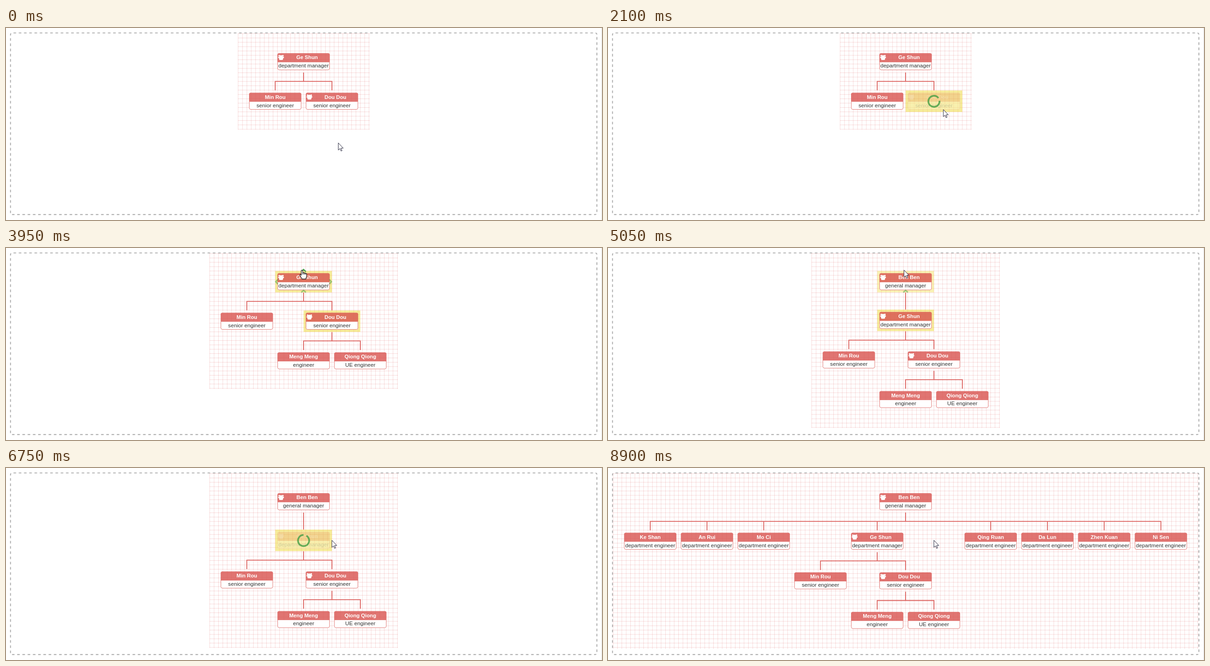
An HTML page with a canvas that plays this animation: 1280 px wide and 414 px high, repeating every 9.7 s.

```html
<!DOCTYPE html>
<html lang="en">
<head>
<meta charset="utf-8">
<title>Org chart</title>
<style>
html, body { margin: 0; width: 100%; height: 100%; overflow: hidden; background: #fff; }
canvas { display: block; }
</style>
</head>
<body>
<canvas id="stage" width="1280" height="414"></canvas>
<script>
const ctx = document.getElementById('stage').getContext('2d');
const LOOP = 9700, STEP = 50;
const MID = 639.1, SLOT = 60.93, ROW = 85.3, TOP = 54.3;
const SCALE = 1280 / 1366;
const RED = 'rgba(217,83,79,0.8)';
const FONT = '"Liberation Sans", Arial, sans-serif';

const person = (name, role, team) => ({ name, role, team });
const people = {
  boss: person('Ben Ben', 'general manager', true),
  head: person('Ge Shun', 'department manager', true),
  left: person('Min Rou', 'senior engineer'),
  lead: person('Dou Dou', 'senior engineer', true),
  dev: person('Meng Meng', 'engineer'),
  ux: person('Qiong Qiong', 'UE engineer')
};
const peers = ['Ke Shan', 'An Rui', 'Mo Ci', 'Qing Ruan', 'Da Lun', 'Zhen Kuan', 'Ni Sen']
  .map(name => person(name, 'department engineer'));
const peerSlots = [-9, -7, -5, 3, 5, 7, 9];

// A tree node: who, horizontal half-slot, header top, children
const node = (who, k, y, kids = []) => ({ who, x: MID + k * SLOT, y, kids });

function team(y, kHead, kLeft, kLead, open) {
  const y3 = y + 2 * ROW;
  const kids = open ? [node(people.dev, kLead - 1, y3), node(people.ux, kLead + 1, y3)] : [];
  return node(people.head, kHead, y, [
    node(people.left, kLeft, y + ROW),
    node(people.lead, kLead, y + ROW, kids)
  ]);
}

const scenes = [
  { from: 0, box: [498.1, 781, 219], root: team(TOP, 0, -1, 1, false) },
  { from: 2450, box: [437.1, 841.9, 304], root: team(TOP, 0, -2, 1, true) },
  { from: 4900, box: [437.1, 841.9, 388], root: node(people.boss, 0, TOP, [team(TOP + 83.5, 0, -2, 1, true)]) },
  { from: 7750, box: [10.5, 1268.2, 390], root: node(people.boss, 0, TOP, [
    ...peers.map((p, i) => node(p, peerSlots[i], TOP + ROW)),
    team(TOP + ROW, -1, -3, 0, true)
  ]) }
];

const ramp = (t, a, b) => Math.min(1, Math.max(0, (t - a) / (b - a)));
const within = (t, a, b) => t >= a && t < b;

function glow(who, t) {
  if (who === people.lead) return ramp(t, 1100, 1500) - ramp(t, 4200, 4450);
  if (who === people.head) return ramp(t, 3520, 3820) - ramp(t, 8800, 8900);
  if (who === people.boss) return ramp(t, 4900, 5100) - ramp(t, 5700, 5800);
  return 0;
}

function loading(who, t) {
  if (who === people.lead) return within(t, 1800, 2450) ? t - 1750 : 0;
  if (who === people.head) {
    if (within(t, 4200, 4900)) return t - 4150;
    if (within(t, 6750, 7750)) return t - 6700;
  }
  return 0;
}

// Cursor: time, x, y
const path = [
  [0, 713.7, 247.8], [650, 713.7, 247.8], [1200, 718.7, 179.3], [1350, 718.7, 179.3],
  [1600, 720.2, 175.8], [3050, 720.2, 175.8], [3850, 635.7, 47.6], [5400, 635.7, 47.6],
  [6180, 699.9, 155.8], [LOOP, 699.9, 155.8]
];

function cursorAt(t) {
  const i = path.findIndex(p => p[0] > t);
  const [t0, x0, y0] = path[i - 1], [t1, x1, y1] = path[i];
  const u = ramp(t, t0, t1), e = u * u * (3 - 2 * u);
  return [x0 + (x1 - x0) * e, y0 + (y1 - y0) * e];
}

const onEdge = t => within(t, 1150, 1800) || within(t, 3750, 4200) || within(t, 6150, 6750);

function roundBox(x, y, w, h, top, bottom) {
  ctx.beginPath();
  ctx.roundRect(x, y, w, h, [top, top, bottom, bottom]);
}

// Dashes run clockwise from the bottom left corner, clipped to the inner half of the stroke
function drawFrame() {
  const w = 1346, h = 420, r = 5, dash = 6;
  const length = 2 * (w + h) - (8 - 2 * Math.PI) * r;
  ctx.save();
  ctx.translate(0.3, 0.3);
  ctx.scale(SCALE, SCALE);
  roundBox(9, 10, w, h, r, r);
  ctx.clip();
  ctx.setLineDash([dash, dash + 2 * dash * dash / length]);
  ctx.lineDashOffset = h - 2 * r + Math.PI / 2 * r;
  ctx.strokeStyle = '#aaa';
  ctx.lineWidth = 4;
  ctx.stroke();
  ctx.restore();
  ctx.fillStyle = '#e2e2e2';
  ctx.fillRect(1279, 0, 1, 414);
}

function drawGrid([x0, x1, y1]) {
  const y0 = 11.65, pitch = 10 * SCALE;
  ctx.fillStyle = 'rgba(200,0,0,0.15)';
  for (let x = x0; x < x1; x += pitch) ctx.fillRect(x, y0, SCALE, y1 - y0);
  for (let y = y0; y < y1; y += pitch) ctx.fillRect(x0, y, x1 - x0, SCALE);
}

function drawLinks({ x, y, kids }) {
  if (!kids.length) return;
  const bar = y + 60.8, xs = kids.map(k => k.x);
  ctx.beginPath();
  ctx.moveTo(x, y + 41.8);
  ctx.lineTo(x, bar);
  if (kids.length > 1) {
    ctx.moveTo(Math.min(...xs) - 0.95, bar);
    ctx.lineTo(Math.max(...xs) + 0.95, bar);
  }
  for (const k of kids) {
    ctx.moveTo(k.x, bar);
    ctx.lineTo(k.x, k.y - 5);
  }
  ctx.strokeStyle = 'rgba(217,83,79,0.88)';
  ctx.lineWidth = 1.9;
  ctx.stroke();
}

function drawTeamIcon(x, y) {
  ctx.fillStyle = '#fff';
  ctx.beginPath();
  for (const [dx, dy, r] of [[-3.9, -3.5, 1.8], [3.9, -3.5, 1.8], [0, -2.2, 2.7]]) {
    ctx.moveTo(x + dx + r, y + dy);
    ctx.arc(x + dx, y + dy, r, 0, 7);
  }
  ctx.roundRect(x - 6.2, y - 1.5, 12.4, 3.2, 1.3);
  ctx.roundRect(x - 4.3, y + 0.2, 8.6, 5.4, 2);
  ctx.fill();
}

function drawCard({ who, x, y }, alpha) {
  const w = 112.4, left = x - w / 2;
  ctx.save();
  ctx.globalAlpha = alpha;
  ctx.fillStyle = RED;
  roundBox(left, y, w, 19, 3.7, 0);
  ctx.fill();
  ctx.fillStyle = '#fff';
  roundBox(left, y + 19, w, 17.4, 0, 3.7);
  ctx.fill();
  ctx.strokeStyle = RED;
  ctx.lineWidth = SCALE;
  roundBox(left + 0.5, y + 19, w - 1, 17, 0, 3.4);
  ctx.stroke();
  ctx.textAlign = 'center';
  ctx.fillStyle = '#fff';
  ctx.font = 'bold 11.25px ' + FONT;
  ctx.fillText(who.name, x + (who.team ? 7.5 : 0), y + 13.1);
  ctx.fillStyle = '#333';
  ctx.font = '11.65px ' + FONT;
  ctx.fillText(who.role, x, y + 31);
  if (who.team) drawTeamIcon(left + 7.8, y + 9);
  ctx.restore();
}

// Quarter turns: 0 down, 1 left, 2 up, 3 right
function chevron(x, y, turn, alpha) {
  ctx.save();
  ctx.translate(x, y);
  ctx.rotate(turn * Math.PI / 2);
  ctx.beginPath();
  ctx.moveTo(-4.8, -2.3);
  ctx.lineTo(0, 2.3);
  ctx.lineTo(4.8, -2.3);
  ctx.strokeStyle = `rgba(68,157,68,${alpha})`;
  ctx.lineWidth = 2.9;
  ctx.stroke();
  ctx.restore();
}

function drawArrows({ who, x, y }, t) {
  const cy = y + 18.55, soft = 0.5, strong = 0.95;
  const sides = (inward, dx, a) => {
    chevron(x - dx, cy, inward ? 3 : 1, a);
    chevron(x + dx, cy, inward ? 1 : 3, a);
  };
  if (who === people.lead && (within(t, 1150, 1800) || within(t, 2450, 3350))) {
    const open = t >= 2450;
    chevron(x, cy - 19, 0, soft);
    sides(true, 57.5, soft);
    chevron(x, cy + (open ? 20.5 : 24), open ? 2 : 0, open ? soft : strong);
  }
  if (who === people.head && within(t, 3550, 4200)) {
    chevron(x, cy - 24, 2, t >= 3750 ? strong : soft);
    sides(false, 57.5, soft);
    chevron(x, cy + 20.6, 2, soft);
  }
  if (who === people.head && within(t, 5950, 6750)) {
    const hot = t >= 6150;
    chevron(x, cy - 19, 0, soft);
    sides(false, hot ? 61.5 : 57.5, hot ? strong : soft);
    chevron(x, cy + 20.6, 2, soft);
  }
  if (who === people.boss && within(t, 4950, 5750)) chevron(x, cy + 20.6, 2, soft);
}

function drawSpinner(x, y, age) {
  const a = -Math.PI / 2 + age / 2000 * Math.PI * 2 + 0.1;
  ctx.beginPath();
  ctx.arc(x, y, 12, a + 0.27, a + Math.PI * 2 - 0.27);
  ctx.strokeStyle = 'rgba(68,157,68,0.8)';
  ctx.lineWidth = 3.6;
  ctx.stroke();
}

function drawNode(n, t) {
  const g = glow(n.who, t), age = loading(n.who, t);
  if (g > 0) {
    ctx.fillStyle = `rgba(238,217,54,${0.5 * g})`;
    ctx.fillRect(n.x - 60.9, n.y - 4.9, 121.8, 46.3);
  }
  drawCard(n, age ? 0.2 : 1);
  drawArrows(n, t);
  if (age) drawSpinner(n.x, n.y + 18.55, age);
}

function drawTree(n, t) {
  drawLinks(n);
  drawNode(n, t);
  n.kids.forEach(k => drawTree(k, t));
}

const arrow = new Path2D('M0 0V15.4L3.5 12.2L5.8 17.5L8 16.6L5.8 11.3H10.6Z');
const hand = new Path2D('M-1.6 1.2Q0-.6 1.6 1.2V5.6Q3.4 4.8 4.5 6.2Q6.3 5.4 7.3 7' +
  'Q9.8 6.8 10 9V13Q9.8 15.2 8.6 17V19.2H-.6V17.4Q-2.8 14.6-4.6 11.4Q-4.7 8.8-2.8 9.8L-1.6 11.2Z');
const knuckles = new Path2D('M1.6 5.6V9.4M4.5 6.2V9.6M7.3 7V9.8');

function drawCursor(t) {
  const over = onEdge(t);
  ctx.save();
  ctx.translate(...cursorAt(t));
  ctx.fillStyle = '#fff';
  ctx.strokeStyle = over ? '#111' : '#25253c';
  ctx.lineWidth = over ? 1.2 : 1;
  ctx.lineJoin = 'round';
  ctx.fill(over ? hand : arrow);
  ctx.stroke(over ? hand : arrow);
  if (over) ctx.stroke(knuckles);
  ctx.restore();
}

function draw(t) {
  const scene = scenes.filter(s => s.from <= t).pop();
  ctx.fillStyle = '#fff';
  ctx.fillRect(0, 0, 1280, 414);
  drawGrid(scene.box);
  drawFrame();
  drawTree(scene.root, t);
  drawCursor(t);
}

const start = performance.now();
function tick() {
  const t = (performance.now() - start) % LOOP;
  draw(Math.floor(t / STEP) * STEP);
  requestAnimationFrame(tick);
}
tick();
</script>
</body>
</html>
```
